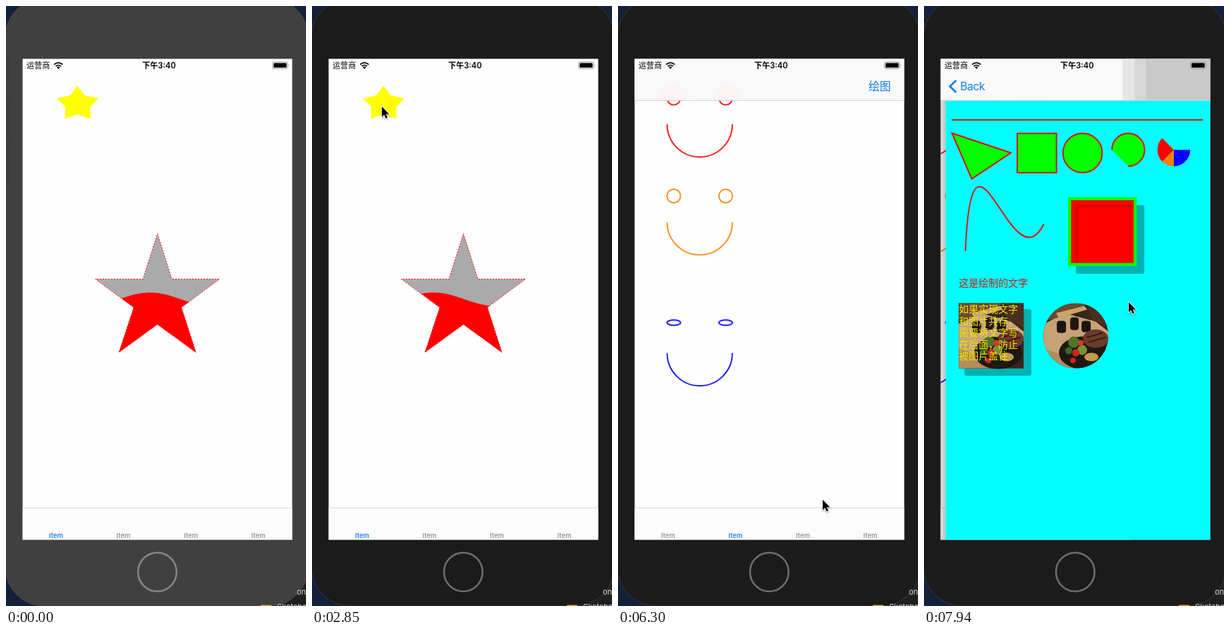
Recreate the animation shown at these times as an HTML page. Size 425 by 847 pixels, loop 8000 ms.

```html
<!DOCTYPE html>
<html lang="zh-CN">
<head>
<meta charset="utf-8">
<title>Drawing demo</title>
<style>
  html, body { margin: 0; width: 100%; height: 100%; overflow: hidden; background: #13203a; }
  svg { display: block; width: 100%; height: 100%; }
  text { font-family: Inter, "Noto Sans CJK SC", "Noto Sans CJK", sans-serif; }
  .phone { --body: #404040; --rim: #4a4a4a; --ring: #858585; }
  .phone.active { --body: #1b1b1b; --rim: #33383d; --ring: #6c6c6c; }
  .body { fill: var(--body); stroke: var(--rim); }
  .ring { fill: none; stroke: var(--ring); stroke-width: 2.6; }
  .keys { fill: #000; opacity: .07; }
  .active .keys { opacity: 0; }
  .status { font-size: 11.1px; }
  .time { font-weight: 600; text-anchor: middle; }
  .tabs text { font-size: 9.3px; font-weight: 600; text-anchor: middle; fill: #949494; }
  .tabs .on { fill: #1a84f0; }
  .nav { font-size: 15.7px; fill: #0f7cf0; }
  .face { fill: none; stroke-width: 1.9; }
  .ink { stroke: #e40b0b; stroke-width: 1.9; }
  .note { font-size: 14px; }
  .cursor { filter: drop-shadow(0 1.2px 1px rgba(0, 0, 0, .4)); }
</style>
</head>
<body>
<svg viewBox="0 0 425 847">
  <defs>
    <clipPath id="screen"><rect x="23.5" y="74.5" width="382" height="679"/></clipPath>
    <clipPath id="below"><rect x="0" y="133" width="600" height="621"/></clipPath>
    <path id="star" d="M214.5 321.5L235 385.5H302.5L248.5 425.5L269 489L214.5 449.5L160 489L181 425.5L126.5 385.5H194Z"/>
    <clipPath id="starClip"><use href="#star"/></clipPath>
    <clipPath id="disc"><circle cx="46" cy="46" r="46"/></clipPath>
    <linearGradient id="edge">
      <stop offset="0" stop-opacity="0"/><stop offset="1" stop-opacity=".17"/>
    </linearGradient>
    <g id="meal">
      <rect width="92" height="92" fill="#35251a"/>
      <path d="M0 30L30 14L74 26L92 40V52L60 58L26 74L0 66Z" fill="#c6a377"/>
      <path d="M0 0H64L40 14L8 24L0 22Z" fill="#6d4a2b"/>
      <path d="M18 14L58 4L62 9L22 21Z" fill="#c9a56c"/>
      <path d="M60 0H92V34L70 24Z" fill="#4a2f1f"/>
      <rect x="19" y="25" width="13" height="17" rx="4" fill="#1c1310"/>
      <rect x="38" y="20" width="12" height="18" rx="4" fill="#241713"/>
      <rect x="54" y="25" width="13" height="16" rx="4" fill="#1c1310"/>
      <path d="M0 64L24 72L44 92H0Z" fill="#b38c5c"/>
      <ellipse cx="56" cy="70" rx="34" ry="23" fill="#1d1813"/>
      <ellipse cx="74" cy="50" rx="18" ry="13" fill="#6b3a2c"/>
      <path d="M62 48L84 42M64 55L88 48" stroke="#36190f" stroke-width="2"/>
      <circle cx="43" cy="55" r="8" fill="#4d7426"/>
      <circle cx="55" cy="66" r="7" fill="#7d8f35"/>
      <circle cx="36" cy="67" r="5" fill="#3f6522"/>
      <circle cx="46" cy="70" r="5" fill="#c92a18"/>
      <circle cx="53" cy="56" r="4" fill="#d23a1e"/>
      <circle cx="42" cy="81" r="4" fill="#c8261a"/>
      <ellipse cx="68" cy="76" rx="10" ry="6" fill="#c49a4c"/>
    </g>
  </defs>

  <rect width="425" height="847" fill="#13203a"/>
  <path d="M345 847V812H425V847Z" fill="#202022"/>
  <g id="phone" class="phone">
    <rect class="body" x="-1" y="-11" width="429" height="858" rx="55"/>
    <path class="keys" d="M0 72H5V105H0ZM0 131H6V190H0ZM0 195H6V251H0Z"/>
    <circle class="ring" cx="214.3" cy="799" r="27.3"/>
  </g>
  <g font-size="11" fill="#d6d6d6">
    <rect x="361" y="845.5" width="15" height="4" fill="#d9a520"/>
    <text x="412" y="831">on</text>
    <text x="384" y="852">Sketches</text>
  </g>

  <g clip-path="url(#screen)">
    <rect x="23" y="74" width="383" height="680" fill="#fefefe"/>

    <g id="starPage">
      <path d="M101.3 112.5L111.5 126L131 130.5L119.5 142.3V159L101.3 153.3L83.5 159L84 142.3L72 130.5L91 126Z" fill="#ff0"/>
      <use href="#star" fill="#aaa"/>
      <g clip-path="url(#starClip)"><path id="wave" fill="#f00"/></g>
      <use href="#star" fill="none" stroke="#f00" stroke-dasharray="2 2"/>
    </g>

    <g id="oldPage">
      <g id="faces" class="face"></g>
      <g class="tabs">
        <rect x="23" y="708" width="383" height="46" fill="#fcfcfc"/>
        <path d="M23 708.5H406" stroke="#dcdcdc"/>
        <text x="71" y="750.5">Item</text>
        <text x="166.5" y="750.5">Item</text>
        <text x="262" y="750.5">Item</text>
        <text x="357.5" y="750.5">Item</text>
      </g>
    </g>
    <rect id="dim" x="23" y="133" width="383" height="621" opacity="0"/>

    <g id="newPage" clip-path="url(#below)">
      <rect x="21.5" y="133" width="9" height="621" fill="url(#edge)"/>
      <rect x="30.5" y="133" width="383" height="621" fill="#0ff"/>
      <g class="ink" fill="#0f0">
        <path d="M39 160.7H395"/>
        <path d="M39.5 179.5L123 207.3L67.5 244Z"/>
        <rect x="132" y="179.8" width="55.5" height="55.5"/>
        <circle cx="224.5" cy="207.5" r="27.8"/>
        <path d="M266 203A23.2 23.2 0 1 1 289.2 226.2"/>
        <path d="M58.5 346C68 119.5 124 398 169.5 308" fill="none"/>
      </g>
      <path d="M353.7 203H376.9A23.2 23.2 0 0 1 353.7 226.2Z" fill="#00f"/>
      <path d="M353.7 203V226.2A23.2 23.2 0 0 1 337.3 219.4Z" fill="#ff8000"/>
      <path d="M353.7 203L337.3 219.4A23.2 23.2 0 0 1 337.3 186.6Z" fill="#f00"/>

      <rect x="215" y="281" width="97" height="97" rx="2" opacity=".3"/>
      <rect x="206" y="272" width="93" height="93" fill="#f00"/>
      <path d="M216.5 364V282.5H298" fill="none" stroke="#000" stroke-width="4" opacity=".13"/>
      <rect x="206" y="272" width="93" height="93" fill="none" stroke="#0f0" stroke-width="4.4"/>

      <text class="note" x="49" y="396" fill="#d4170e">这是绘制的文字</text>
      <rect x="57" y="428" width="95" height="94" rx="3" opacity=".3"/>
      <use href="#meal" x="49" y="419.6"/>
      <g class="note" fill="#f0e400">
        <text x="49" y="433">如果实现文字</text>
        <text x="49" y="449.5">和图片共存，</text>
        <text x="49" y="466">需要将文字写</text>
        <text x="49" y="482.5">在后面，防止</text>
        <text x="49" y="499">被图片盖住</text>
      </g>
      <g transform="translate(169 419.6)"><use href="#meal" clip-path="url(#disc)"/></g>
    </g>

    <g id="navBar" class="nav">
      <rect x="23" y="74" width="383" height="59" fill="#f9f9f9"/>
      <g id="blur" fill="#faf4f4">
        <path d="M52 133V124Q58 122 60 116Q70 112 74 110H86Q92 114 97 116Q97 122 101 124V129H96V133Z"/>
        <path d="M137 133V120Q142 118 144 112Q150 109 156 110Q166 111 170 117L176 122V130L172 133Z"/>
      </g>
      <g id="shade">
        <rect x="281" y="74" width="17" height="59" fill="#e6e6e6"/>
        <rect x="298" y="74" width="16" height="59" fill="#d7d7d7"/>
        <rect x="314" y="74" width="500" height="59" fill="#c8c8c8"/>
      </g>
      <path d="M23 133.4H406" stroke="#d2d2d2"/>
      <text id="draw" x="355" y="119">绘图</text>
      <g id="back">
        <path d="M45.5 105L36.5 113.5L45.5 122" fill="none" stroke="#0f7cf0" stroke-width="2.6"/>
        <text x="51" y="119" letter-spacing="-.4">Back</text>
      </g>
    </g>

    <g class="status">
      <text x="29" y="88">运营商</text>
      <text class="time" x="216.8" y="88">下午3:40</text>
      <g fill="none" stroke="#000" stroke-width="1.9">
        <path d="M68.3 82.6A8.6 8.6 0 0 1 80.3 82.6M70.6 85.1A5.4 5.4 0 0 1 78 85.1"/>
      </g>
      <path d="M74.3 89L72 86.6A3.3 3.3 0 0 1 76.6 86.6Z"/>
      <rect x="377.5" y="79" width="21.5" height="9.6" rx="2.4" fill="none" stroke="#999"/>
      <rect x="379" y="80.5" width="18.5" height="6.6" rx="1.2"/>
      <path d="M400.2 82V85.6Q401.4 83.8 400.2 82Z" fill="#888"/>
    </g>
  </g>
  <rect x="23.5" y="74.5" width="382" height="679" fill="none" stroke="#777" stroke-opacity=".35"/>

  <path id="cursor" class="cursor" d="M0 0V14.4L3.3 11.4L5.5 16.6L8 15.5L5.8 10.4H10.2Z" stroke="#fff" stroke-width="1.7" paint-order="stroke"/>
</svg>

<script>
const LOOP = 8000, WIDTH = 382, STAR_WAVE = 176;
const FOCUS = 2550, SWITCH = 5250, PRESS = 7340, PUSH = 7640;
const $ = id => document.getElementById(id);
const tabs = [...document.querySelectorAll('.tabs text')];

// time, x, y of the pointer tip
const path = [
  [1500, 170, 759], [1650, 128, 540], [1800, 82, 300], [1950, 71, 230], [2100, 72, 219],
  [2250, 80, 198], [2550, 98, 145], [2700, 99, 142], [3450, 99, 142], [3600, 104, 190],
  [4200, 150, 669], [4500, 163, 775], [4800, 166, 742], [5100, 165, 740], [5550, 165, 740],
  [5850, 149, 725], [6300, 290, 697], [6600, 357, 302], [7050, 350, 143], [7640, 350, 143],
  [7940, 290, 418], [8000, 290, 418]
];

function pointer(t) {
  const i = path.findIndex(p => p[0] > t);
  const [t0, x0, y0] = path[i - 1], [t1, x1, y1] = path[i];
  const k = (t - t0) / (t1 - t0);
  return [x0 + (x1 - x0) * k, y0 + (y1 - y0) * k];
}

function face(y, color, ry) {
  const eye = x => `<ellipse cx="${x}" cy="${y}" rx="9.6" ry="${ry}"/>`;
  const mouth = y + (ry < 9 ? 43 : 37);
  return `<g stroke="${color}">${eye(79)}${eye(152.6)}<path d="M69.6 ${mouth}a46.2 46.2 0 0 0 92.4 0"/></g>`;
}
$('faces').innerHTML = face(130, '#f81c1c', 9.6) + face(268.2, '#fb8c1c', 9.6) + face(447, '#1c1cf8', 3.8);

function wave(t) {
  const peak = 204 - 0.1347 * t;
  let d = 'M126 500';
  for (let x = 126; x <= 304; x += 2) {
    const y = 414 - 9.5 * Math.cos((x - peak) * 2 * Math.PI / STAR_WAVE);
    d += `L${x} ${y.toFixed(2)}`;
  }
  return d + 'L304 500Z';
}

const show = (id, on) => $(id).style.display = on ? '' : 'none';
const move = (id, x, y = 0) => $(id).setAttribute('transform', `translate(${x} ${y})`);
const fade = (id, o) => $(id).setAttribute('opacity', o);

const hold = t => t < PRESS ? Math.floor(t / 150) * 150 : PRESS + Math.floor((t - PRESS) / 150) * 150;

function render(t) {
  const second = t >= SWITCH, pushing = t >= PUSH;
  $('phone').classList.toggle('active', t >= FOCUS);
  show('starPage', !second);
  show('faces', second);
  show('navBar', second);
  show('newPage', pushing);
  tabs.forEach((el, i) => el.classList.toggle('on', i === +second));
  if (!second) $('wave').setAttribute('d', wave(t));

  // critically damped push
  const s = pushing ? (t - PUSH) / 1000 * 19.7 : 0;
  const left = (1 + s) * Math.exp(-s), done = 1 - left, off = WIDTH * left;
  move('newPage', off - 7);
  move('shade', off - 7);
  move('oldPage', -0.3 * WIDTH * done);
  move('back', off * 0.3 - 2);
  fade('dim', 0.08 * done);
  fade('shade', done);
  fade('back', done);
  fade('blur', left);
  fade('draw', t < PRESS ? 1 : 0.2 * left);

  const visible = t >= path[0][0];
  show('cursor', visible);
  if (visible) move('cursor', ...pointer(t));
}

const start = performance.now();
function tick(now) {
  render(hold(Math.max(0, now - start) % LOOP));
  requestAnimationFrame(tick);
}
render(0);
requestAnimationFrame(tick);
</script>
</body>
</html>
```
